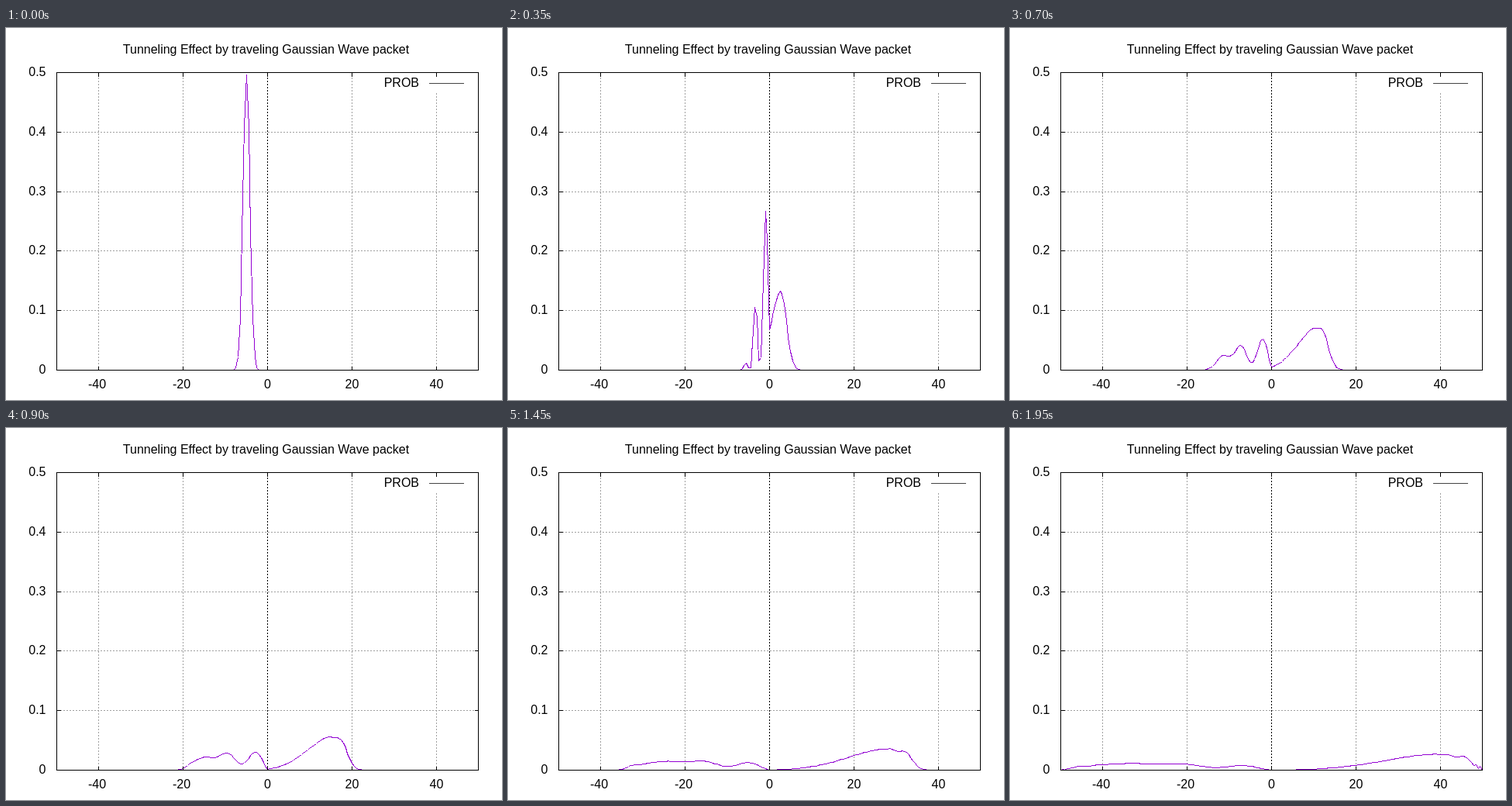
Recreate the animation shown at these times as an HTML page. Size 640 by 480 pixels, loop 2000 ms.

```html
<!DOCTYPE html>
<html lang="en">
<head>
<meta charset="utf-8">
<title>Tunneling Effect</title>
<style>
  html, body { margin: 0; width: 100%; height: 100%; overflow: hidden; background: #fff; }
  svg { display: block; width: 640px; height: 480px; }
  text { font: 16px "Liberation Sans", Arial, sans-serif; fill: #000; }
  path { fill: none; stroke-width: 1; shape-rendering: crispEdges; }
</style>
</head>
<body>
<svg id="stage" viewBox="0 0 640 480">
  <clipPath id="plot"><rect x="65" y="57" width="545" height="385"/></clipPath>
</svg>
<script>
const FRAMES = 40, FRAME_MS = 50;
const LEFT = 65, RIGHT = 609, TOP = 57, BOTTOM = 441;
const svg = document.getElementById('stage');

const px = x => Math.round(LEFT + (x + 50) / 100 * (RIGHT - LEFT));
const py = p => Math.round(BOTTOM - p / 0.5 * (BOTTOM - TOP));

function add(tag, attrs, text) {
  const el = document.createElementNS('http://www.w3.org/2000/svg', tag);
  for (const name in attrs) el.setAttribute(name, attrs[name]);
  if (text !== undefined) el.textContent = text;
  svg.appendChild(el);
  return el;
}

const line = (x1, y1, x2, y2, stroke, dash = 'none') =>
  add('path', {
    d: `M${x1 + 0.5} ${y1 + 0.5}L${x2 + 0.5} ${y2 + 0.5}`,
    stroke, 'stroke-dasharray': dash
  });

const label = (x, y, text, anchor = 'middle') =>
  add('text', { x, y, 'text-anchor': anchor }, text);

// Gaussian packet meeting a one-site barrier at x = 0, units hbar = m = 1.
function simulate() {
  const dx = 0.5, n = 201, mid = 100;
  const x0 = -5, sigma = 0.805, k0 = 1.6, barrier = 2;
  const frameTime = 0.68, steps = 34, dt = frameTime / steps;
  const hop = 1 / (2 * dx * dx);
  const re = new Float64Array(n), im = new Float64Array(n);
  const norm = Math.pow(2 * Math.PI * sigma * sigma, -0.25);

  for (let i = 1; i < n - 1; i++) {
    const x = (i - mid) * dx;
    const amp = norm * Math.exp(-((x - x0) ** 2) / (4 * sigma * sigma));
    re[i] = amp * Math.cos(k0 * x);
    im[i] = amp * Math.sin(k0 * x);
  }

  // to += h * H(from), with both ends held at zero
  function kick(to, from, h) {
    for (let i = 1; i < n - 1; i++) {
      const v = i === mid ? barrier : 0;
      to[i] += h * ((2 * hop + v) * from[i] - hop * (from[i - 1] + from[i + 1]));
    }
  }

  const paths = [];
  for (let f = 0; f < FRAMES; f++) {
    let d = '';
    for (let i = 0; i < n; i++) {
      const p = re[i] * re[i] + im[i] * im[i];
      d += `${i ? 'L' : 'M'}${px((i - mid) * dx) + 0.5} ${py(p) + 0.5}`;
    }
    paths.push(d);
    for (let s = 0; s < steps; s++) {
      kick(im, re, -dt / 2);
      kick(re, im, dt);
      kick(im, re, -dt / 2);
    }
  }
  return paths;
}

const xTicks = [-40, -20, 0, 20, 40];
const yTicks = [0, 0.1, 0.2, 0.3, 0.4, 0.5];

// Grid, leaving room for the key
for (const p of yTicks.slice(1, -1)) line(LEFT, py(p), RIGHT, py(p), '#a0a0a0', '2 2');
for (const x of xTicks) line(px(x), BOTTOM, px(x), x === 40 ? 81 : TOP, '#a0a0a0', '2 2');
line(px(0), BOTTOM, px(0), TOP, '#000', '2 2');

const curve = add('path', { stroke: '#9400d3', 'clip-path': 'url(#plot)' });

// Frame, ticks and labels
add('path', {
  d: `M${LEFT + 0.5} ${TOP + 0.5}H${RIGHT + 0.5}V${BOTTOM + 0.5}H${LEFT + 0.5}Z`,
  stroke: '#000'
});
for (const x of xTicks) {
  line(px(x), BOTTOM, px(x), BOTTOM - 5, '#000');
  line(px(x), TOP, px(x), TOP + 5, '#000');
  label(px(x) + (x < 0 ? -1.5 : 0.5), 465, x);
}
for (const p of yTicks) {
  line(LEFT, py(p), LEFT + 5, py(p), '#000');
  line(RIGHT, py(p), RIGHT - 5, py(p), '#000');
  label(51.5, py(p) + 5, p, 'end');
}
label(335.5, 33, 'Tunneling Effect by traveling Gaussian Wave packet');
label(533, 76, 'PROB', 'end');
line(545, 71, 590, 71, '#444');

const paths = simulate();
let shown = -1;
function draw() {
  const f = Math.floor(performance.now() / FRAME_MS) % FRAMES;
  if (f !== shown) curve.setAttribute('d', paths[shown = f]);
  requestAnimationFrame(draw);
}
draw();
</script>
</body>
</html>
```
